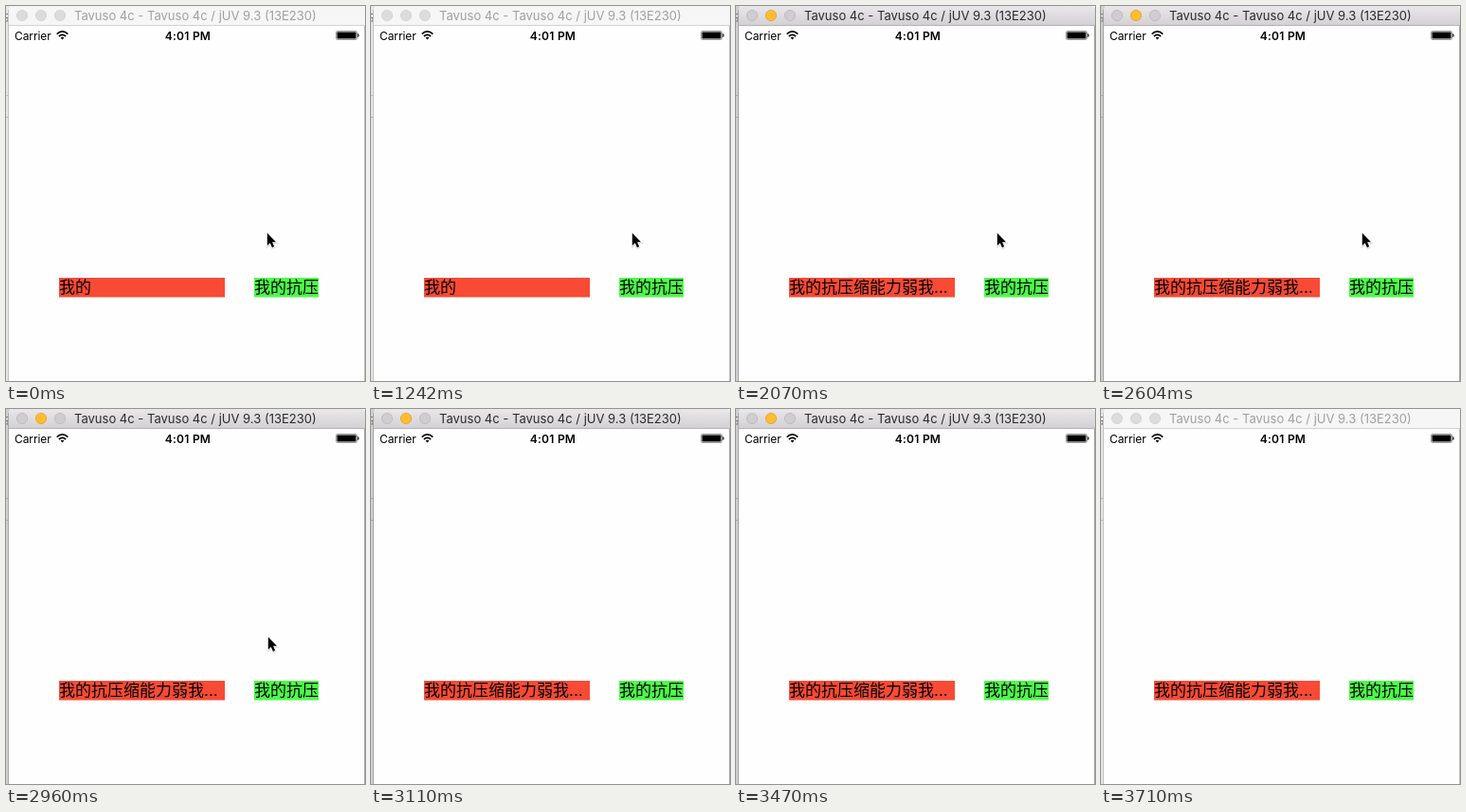
Animation of 379x396 px, one loop 3810 ms. Source, as an HTML page:

```html
<!DOCTYPE html>
<html lang="zh-CN">
<head>
<meta charset="utf-8">
<style>
html, body { margin: 0; width: 100%; height: 100%; overflow: hidden; background: #fefefe; }
svg { display: block; width: 379px; height: 396px; }
text { font-family: Inter, Roboto, sans-serif; white-space: pre; }
.label { font: 17px "Noto Sans CJK SC", "Noto Sans CJK", sans-serif; }
.dots { font-family: Inter, sans-serif; }
</style>
</head>
<body>
<svg viewBox="0 0 379 396">
  <defs>
    <linearGradient id="activeBar" x2="0" y2="1">
      <stop stop-color="#e9e7e9"/><stop offset="1" stop-color="#d2d0d2"/>
    </linearGradient>
    <path id="arrow" d="M0 0V13.2L3 10.5L5.1 15.3L7.3 14.3L5.3 9.5H9.2Z"/>
  </defs>

  <!-- window behind -->
  <rect id="behind" width="4" height="396"/>
  <path id="behindLines" d="M0 94.5H3M0 117.5H3"/>
  <path d="M0 8.5H2M0 12.5H2V16H0" fill="none" stroke="#777"/>

  <!-- simulator window -->
  <rect x="3" y="20" width="376" height="376" fill="#fefefe"/>
  <path id="bar" d="M3 21V4Q3 0 7 0H375Q379 0 379 4V21Z"/>
  <path id="barLine" d="M3 20.5H379"/>
  <path id="sides" d="M2.5 4V396M378.5 21V396" fill="none"/>
  <g id="lights" stroke-width=".8">
    <circle cx="17" cy="10" r="5.6"/>
    <circle cx="37" cy="10" r="5.6"/>
    <circle cx="57" cy="10" r="5.6"/>
  </g>
  <text id="title" x="72" y="15" font-size="13">Tavuso 4c - Tavuso 4c / jUV 9.3 (13E230)</text>

  <!-- status bar -->
  <text x="9" y="35.5" font-size="12" letter-spacing="-.1">Carrier</text>
  <g fill="none" stroke="#000" stroke-width="1.7">
    <path d="M53.7 29.7Q59.5 24.2 65.3 29.7M55.9 32Q59.5 28.7 63.1 32"/>
    <path d="M59.5 35.6L57.6 33.5Q59.5 31.9 61.4 33.5Z" fill="#000" stroke="none"/>
  </g>
  <text x="192" y="35.5" font-size="12" font-weight="600" letter-spacing=".25" text-anchor="middle">4:01 PM</text>
  <rect x="348.5" y="26.5" width="22" height="9" rx="1.5" fill="none" stroke="#999"/>
  <rect x="349.5" y="27.5" width="20" height="7" rx=".7"/>
  <path d="M371.7 29.2Q373.2 31 371.7 32.8Z" stroke="#000" stroke-width=".5"/>

  <!-- labels -->
  <rect x="56" y="287" width="175" height="20.5" fill="#f84a34"/>
  <text class="label" x="56" y="303"><tspan id="redText"></tspan><tspan id="dots" class="dots">...</tspan></text>
  <rect x="262" y="287" width="68" height="20.5" fill="#4cfb48"/>
  <text class="label" x="262" y="303">我的抗压</text>

  <g id="cursor">
    <use href="#arrow" x=".3" y="1" fill="#999" opacity=".3" stroke="#999" stroke-width="2"/>
    <use href="#arrow" stroke="#fff" stroke-width="1.2" paint-order="stroke"/>
  </g>
</svg>
<script>
const LOOP = 3810;
const PRESS = 2070, NUDGE = 2960, HIDE = 3110, RELEASE = 3710;
const el = id => document.getElementById(id);
const set = (node, attrs) => {
  for (const key in attrs) node.setAttribute(key, attrs[key]);
};

function drawWindow(active) {
  set(el('bar'), { fill: active ? 'url(#activeBar)' : '#f6f6f6' });
  set(el('barLine'), { stroke: active ? '#b4b2b4' : '#d3d3d3' });
  set(el('sides'), { stroke: active ? '#a8a8a8' : '#c4c4c4' });
  set(el('behind'), { fill: active ? '#d0d0d2' : '#e6e6e8' });
  set(el('behindLines'), { stroke: active ? '#a9a9a9' : '#bdbdbd' });
  set(el('title'), { fill: active ? '#2c2c2c' : '#a0a0a0' });
  [...el('lights').children].forEach((light, i) => {
    const lit = active && i === 1;
    set(light, {
      fill: lit ? '#fdbd2f' : active ? '#cfcdcf' : '#dcdcdc',
      stroke: lit ? '#e0a028' : active ? '#b9b7b9' : '#d0d0d0'
    });
  });
}

function render(t) {
  const grown = t >= PRESS;
  drawWindow(grown && t < RELEASE);
  el('redText').textContent = grown ? '我的抗压缩能力弱我' : '我的';
  set(el('dots'), { display: grown ? 'inline' : 'none' });
  const shift = t >= NUDGE ? 1 : 0;
  set(el('cursor'), {
    transform: `translate(${275.8 + shift} ${239.7 + shift})`,
    display: t < HIDE ? 'inline' : 'none'
  });
}

const start = performance.now();
function tick() {
  render((performance.now() - start) % LOOP);
  requestAnimationFrame(tick);
}
tick();
</script>
</body>
</html>
```
